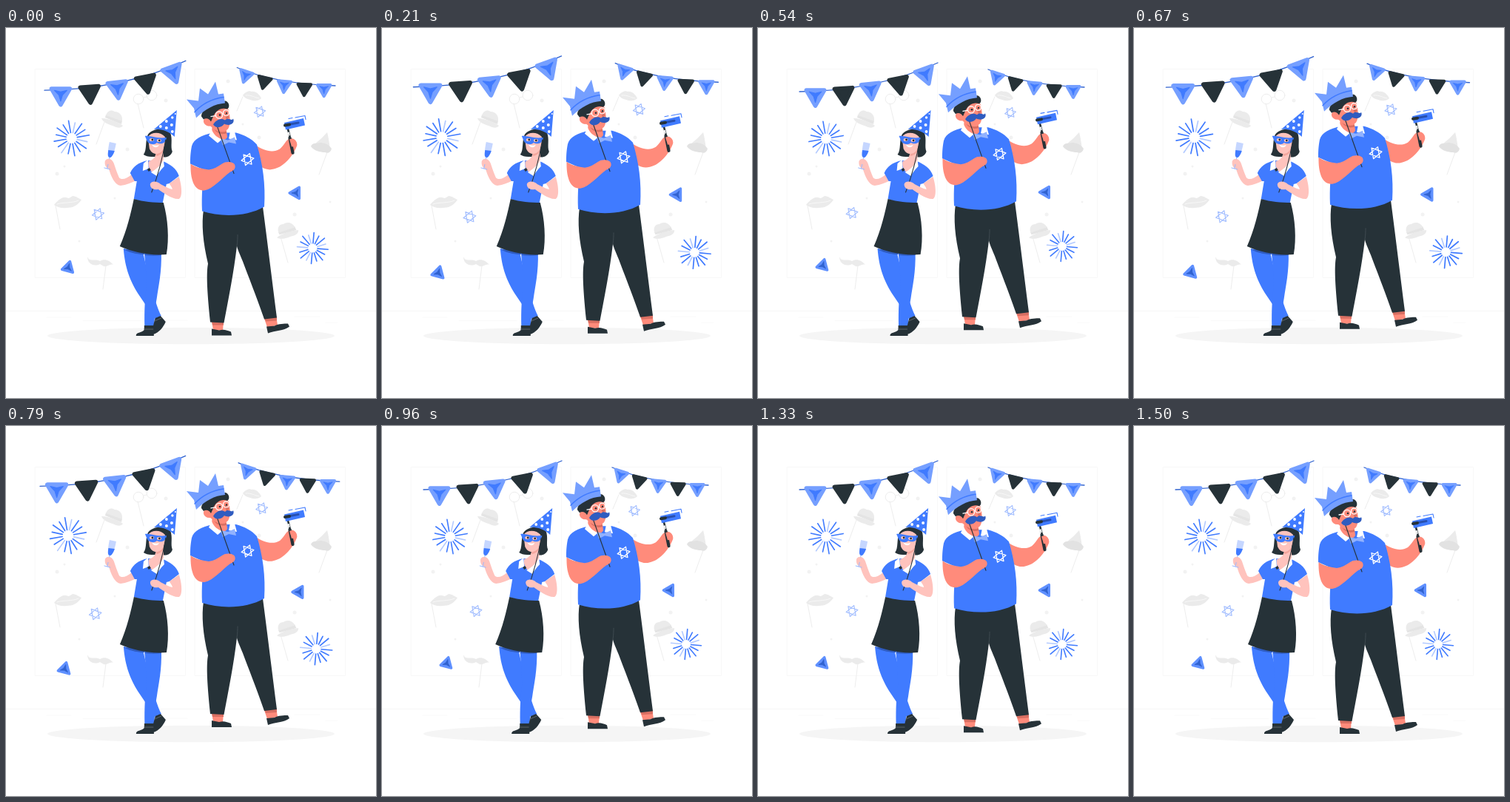
These frames come from a looping animation (500x500 px, 1540 ms). An HTML page:

```html
<!DOCTYPE html>
<html lang="en">
<head>
<meta charset="utf-8">
<title>Party</title>
<style>
html, body { margin: 0; width: 100%; height: 100%; overflow: hidden; background: #fff; }
svg { display: block; width: 100%; height: 100%; }
.blue { fill: #407bff; } .light { fill: #759fff; } .dark { fill: #263238; }
.deep { fill: #2f5cc0; } .white { fill: #fff; } .grey { fill: #ebebeb; }
.tan { fill: #ff8b7b; } .pink { fill: #ffc3bd; } .shade { fill: #d96f62; }
.line { fill: none; stroke-linecap: round; stroke-linejoin: round; }
</style>
</head>
<body>
<svg viewBox="0 0 500 500">
  <g class="line" stroke="#f8f8f8">
    <rect x="39.500" y="55.500" width="203" height="282"/>
    <rect x="255.500" y="55.500" width="203" height="282"/>
    <path stroke="#f6f6f6" d="M0 382.500H500"/>
    <path stroke="#fafafa" d="M55 391H88M104 395.500H182M390 390H424M432 398H448M215 395H245"/>
  </g>
  <ellipse cx="250" cy="416" rx="194" ry="11.300" fill="#f5f5f5"/>

  <g id="props">
    <g class="line" stroke="#ededed">
      <path d="M133 127L122 157M178 102L186 135M67 240L73 272M135 321L131 353M371 282L381 317M434 168L423 198M320 93L312 112"/>
      <circle cx="179" cy="96" r="6.800"/><circle cx="197" cy="91" r="6.800"/><path d="M186 94L190 93"/>
    </g>
    <g class="grey" id="hat">
      <path d="M129 122C135 121 152 127 158 132C155 136 150 135 144 132C137 130 131 127 129 122Z"/>
      <path fill="#e4e4e4" d="M134 121L135 117L157 125L156 130Z"/>
      <path d="M135 118C137 111 143 110 147 113C153 113 158 118 157 126Z"/>
    </g>
    <use href="#hat" transform="translate(234 152) rotate(-38 144 122)"/>
    <path class="grey" d="M65 239C70 233 76 228 81 229L85 230L90 227C95 227 99 231 102 232C97 240 90 243 82 243C75 244 69 242 65 239Z"/>
    <path class="line" stroke="#f8f8f8" d="M69 238C78 235 90 237 98 233"/>
    <path class="grey" d="M320 91C323 87 328 84 332 86C337 85 342 89 345 95C341 99 335 99 330 97C325 96 322 94 320 91Z"/>
    <path class="line" stroke="#f8f8f8" d="M324 91C331 90 336 94 342 95"/>
    <path class="grey" d="M110 309C113 317 120 311 127 315C133 311 140 314 145 320C140 318 138 323 132 322L127 319C119 323 110 319 110 309Z"/>
    <path class="grey" d="M418 156C425 151 430 145 434 141C436 148 437 157 438 163Z"/>
    <path fill="#e2e2e2" d="M412 160C414 154 420 157 424 155C430 155 436 157 440 163C439 168 435 170 431 168C425 168 416 166 412 160Z"/>
    <g fill="#f2f2f2" id="dots"></g>
  </g>

  <g id="decor"></g>

  <g id="woman">
    <path class="blue" d="M159 298C161 325 168 341 178 358L203 395L210 389C203 375 196 350 185 302Z"/>
    <path class="blue" d="M187 302L210 302C211 330 206 350 204 365C201 380 202 390 200 403L187.500 403C187 380 188 365 190 350C190 330 188 315 187 302Z"/>
    <path class="deep" d="M159 299C170 305 180 306 187 306V302ZM188 304L210 303V307C202 308 195 308 188 307Z"/>
    <path class="dark" d="M202 392L209 389L216 397C213 404 207 412 199 414C197 408 200 399 202 392ZM187 402L200 402V416H176C175 411 184 412 187 408Z"/>
    <path class="line" stroke="#5c6468" d="M201 396L210 392M187 407H199"/>
    <path class="pink" d="M170 198C163 204 156 206 153 202C150 195 148 189 146 183C144 176 136 175 134 180C133 186 136 189 139 190C142 200 147 212 155 213C163 212 170 209 176 206Z"/>
    <path class="blue" d="M191 179C179 182 172 187 168 196L174 207L177 207L173 231C185 236 200 237 212 236L217 211L221 210L234 200C231 190 222 184 212 180Z"/>
    <path class="dark" d="M173 231C186 235 200 236 213 236C219 258 221 285 217 306C195 308 172 303 154 295C164 272 169 250 173 231Z"/>
    <path class="dark" d="M192 144C198 135 216 134 222 141C226 150 222 160 225 167C223 173 217 176 211 174L197 174C192 174 189 173 186 171C191 165 188 152 192 144Z"/>
    <path class="pink" d="M203 165L213 160L213 179C208 189 202 195 197 194C193 190 192 184 193 180C200 178 203 174 203 165Z"/>
    <path fill="#f4a79e" d="M203 169C208 170 212 166 213 163V166C211 170 207 173 203 173Z"/>
    <path class="pink" d="M192 147C197 140 209 140 215 147C216 157 214 164 209 168C203 172 197 170 194 163Z"/>
    <path class="white" d="M192 178L186 183L185 193L193 190ZM196 195C203 191 210 185 213 178L214 187C209 192 206 196 204 200Z"/>
    <path class="dark" d="M191 191L194 189L196 192L193 194Z"/>
    <path class="white" d="M197 157C200 159 204 159 207 158C205 163 199 162 197 157Z"/>
    <path class="blue" d="M188 146C195 145 204 150 217 148C217 156 209 158 204 155C200 159 193 157 191 153Z"/>
    <g class="pink"><ellipse cx="197" cy="151" rx="3" ry="2"/><ellipse cx="207" cy="152" rx="3" ry="2"/></g>
    <g class="dark"><circle cx="198" cy="151" r="1.400"/><circle cx="207.500" cy="152" r="1.400"/></g>
    <path class="blue" d="M231 111L200 137C210 136 221 140 228 147Z"/>
    <g class="white">
      <circle cx="225" cy="121" r="1.700"/><circle cx="217" cy="126" r="1.900"/><circle cx="224" cy="131" r="2"/>
      <circle cx="209" cy="133" r="1.900"/><circle cx="217" cy="135" r="2"/><circle cx="225" cy="140" r="1.900"/><circle cx="229" cy="116" r="1"/>
    </g>
    <path class="line" stroke="#263238" stroke-width="1.100" d="M216 151C212 175 206 198 197 222"/>
    <path class="pink" d="M221 210L234 201C238 214 239 228 234 231C225 232 212 222 206 218C200 219 195 217 195 211C197 206 205 207 209 211C215 214 220 217 225 218C225 215 222 213 221 210Z"/>
    <path fill="#c5d6ff" d="M140 154L149 156C147 168 143 176 140 175C137 174 138 163 140 154Z"/>
    <path class="blue" d="M138.500 165L147 166C145 172 142 176 140 175C137 174 138 169 138.500 165Z"/>
    <path class="line" stroke="#9ab8ff" d="M140 175L137 190M133 189L141 191"/>
    <path class="pink" d="M134 181C135 176 140 176 143 179L144 184L137 184Z"/>
  </g>

  <g id="man">
    <path class="tan" d="M278 396H294L293 409H280ZM348 390L365 389L367 402L353 405Z"/>
    <path class="shade" d="M278 397H294V402H279ZM349 392L366 391V396L351 397Z"/>
    <path class="dark" d="M278 407L288 409C294 407 299 409 304 411L305 416H278ZM352 404L363 403C368 400 376 400 381 400L383 404C375 410 364 409 354 413Z"/>
    <path class="dark" d="M267 246L347 242C354 296 360 345 366 392L349 394C338 362 327 335 320 316C316 306 313 300 312 295C308 330 300 370 294.500 399L276 398C271 350 271 330 273 319C266 290 264 265 267 246Z"/>
    <path class="line" stroke="#465157" stroke-width=".8" d="M312 295C313 289 313 283 313 280"/>
    <path class="tan" d="M336 158C348 166 360 170 370 164C376 159 378 152 383 150C390 148 394 154 393 160C388 173 376 188 362 191C352 194 344 188 341 185Z"/>
    <path class="blue" d="M279 142C264 146 254 150 251 160C249 170 249 178 249 184L267 192C266 210 264 225 265 248C290 256 325 256 349 242C351 212 347 184 339 158C332 150 322 145 311 142Z"/>
    <path class="tan" d="M279 126L297 132L299 148C297 151 296 152 292 151C286 151 281 148 278 142Z"/>
    <path class="shade" d="M281 137C286 141 292 142 298 140L298 143C291 145 285 143 281 137Z"/>
    <path class="white" d="M278 138L274 146L286 156L292 151C286 149 281 145 278 138ZM303 140L309 141L312 152L301 150Z"/>
    <path fill="#91b2ff" d="M290 150L300 152L309 148L311 157L301 155L293 159Z"/>
    <path class="tan" d="M276 116C282 106 296 104 301 111C303 121 304 131 300 137C295 142 288 141 283 138L276 133C267 134 264 124 270 122Z"/>
    <path class="dark" d="M264 120C264 110 280 100 297 99C303 102 302 109 299 110C291 107 284 112 281 118L277 127C274 122 270 122 267 124Z"/>
    <path class="shade" d="M295 115L302 121L298 124Z"/>
    <g class="line" stroke="#fff" stroke-width="1.300"><circle cx="288" cy="118" r="4.600"/><circle cx="297.500" cy="115" r="4"/><path d="M283 119L277 120"/></g>
    <g class="dark"><circle cx="289" cy="118" r="1.300"/><circle cx="298" cy="115.500" r="1.200"/></g>
    <path class="light" d="M257 122L254 109L244 97L260 99L262 82L273 90L283 73L287 90L294 89L296 102C282 103 269 110 257 122Z"/>
    <path class="line" stroke="#407bff" stroke-width="1.500" d="M255 114C266 102 280 96 294 94"/>
    <path class="line" stroke="#263238" stroke-width="1.100" d="M285 132L308 197"/>
    <path class="deep" d="M280 131C283 125 291 121 296 125C300 120 305 127 307 123C310 129 302 134 295 130C291 136 283 136 280 131Z"/>
    <path class="tan" d="M249.500 184C256 189 266 191 274 192C281 191 286 188 292 184C297 180 307 181 309 185C311 190 308 193 303 195C292 203 280 218 268 220C254 221 249 205 249.500 184Z"/>
    <path class="line" stroke="#263238" stroke-width="2.600" d="M380.500 135L384 149"/>
    <path class="line" stroke="#fff" stroke-width="2" d="M382 142L382.600 145"/>
    <path class="line" stroke="#263238" stroke-width="4.200" d="M383.500 149L387.500 169"/>
    <path class="tan" d="M383 151C388 148 395 155 393 160L386 161Z"/>
    <path class="blue" d="M376 128.500L402 122.500L404 132L378 138Z"/>
    <path class="line" stroke="#2850b0" stroke-width="3" d="M384 130.500L395 128.500"/>
    <path class="line" stroke="#263238" stroke-width="4" d="M377 132L383 131"/>
    <path class="line" stroke="#407bff" stroke-width="1.100" d="M382 123L387 122M391 121.500L404 119L405 124"/>
    <g id="badge"></g>
  </g>
</svg>
<script>
const el = id => document.getElementById(id);
const FRAME = 1000 / 24, LAST = 36, LOOP = 1540, CYCLE = 1500;

const ring = (n, r, start) => Array.from({ length: n }, (_, i) => {
  const a = (start + i * 360 / n) * Math.PI / 180;
  return [r * Math.cos(a), r * Math.sin(a)].map(v => v.toFixed(2)).join(' ');
});
const poly = points => 'M' + points.join('L') + 'Z';
const place = (x, y, rot, body) => `<g transform="translate(${x} ${y}) rotate(${rot})">${body}</g>`;

// Rounded triangle, with a three-armed fold unless it is dark
function flag(x, y, rot, r, color, fold) {
  const inner = ring(3, r * .2, -90), outer = ring(3, r * .68, -30);
  const star = poly(inner.flatMap((p, i) => [p, outer[i]]));
  return place(x, y, rot,
    `<path d="${poly(ring(3, r, -30))}" fill="${color}" stroke="${color}" stroke-width="${r * .4}" stroke-linejoin="round"/>` +
    (fold ? `<path d="${star}" fill="${fold}" stroke="${fold}" stroke-width="${r * .08}" stroke-linejoin="round"/>` : ''));
}
const bunting = (flags, r) => flags.map(([x, y, rot], i) =>
  i % 2 ? flag(x, y, rot, r, '#263238') : flag(x, y, rot, r, '#759fff', '#407bff')).join('');
const cookie = (x, y, rot) => flag(x, y, rot, 8.6, '#5f90ff', '#3062cf');

const hexagram = (x, y, r, color, width) => place(x, y, 20,
  `<path class="line" stroke="${color}" stroke-width="${width}" d="${poly(ring(3, r, -90)) + poly(ring(3, r, 90))}"/>`);

function firework(x, y, r, rot, pale) {
  let rays = '';
  for (let i = 0; i < 16; i++) {
    const color = pale.includes(i) ? '#b3caff' : '#407bff';
    const end = r - (i % 2) * 2.5;
    rays += `<path stroke="${color}" d="M${r * .32} 0H${end}" transform="rotate(${i * 22.5})"/>`;
  }
  return place(x, y, rot, `<g class="line" stroke-width="1.600">${rays}</g>`);
}

const rope = d => `<path class="line" stroke="#3062cf" stroke-width="1.300" d="${d}"/>`;

el('decor').innerHTML =
  rope('M56 86Q160 85 243 47') +
  bunting([[77.5, 91, 0], [116, 88.5, -4], [152.5, 82.5, -6], [190.5, 75, -11], [226, 62, -20]], 14) +
  rope('M311 56Q360 77 441 80') +
  bunting([[322.5, 66, 18], [347, 74, 13], [373.5, 79, 5], [400, 83, 2], [426, 84, 0]], 9.9) +
  cookie(87.5, 321, 75) + cookie(389, 222, 90) +
  firework(92, 149.5, 23.5, -10, [1, 6, 13]) + firework(411, 295, 20.5, 5, [5, 8, 11, 15]) +
  hexagram(127, 250, 8, '#a3beff', 1.1) + hexagram(341, 114.5, 7.6, '#a3beff', 1.1);
el('badge').innerHTML = hexagram(326.5, 178, 8.5, '#fff', 1.3);
el('dots').innerHTML =
  [[164, 164, 2.5], [216, 98, 2.5], [69, 197, 2.5], [79, 187, 1.5], [99, 288, 1.5], [147, 230, 1.5],
   [300, 72, 2.5], [342, 148, 2.5], [390, 252, 2.5], [438, 235, 1.5], [320, 130, 1.5]]
    .map(([x, y, r]) => `<circle cx="${x}" cy="${y}" r="${r}"/>`).join('');

// Linear interpolation through [percent, value] stops
function track(stops, p) {
  const i = Math.max(1, stops.findIndex(s => s[0] >= p));
  const [[p0, v0], [p1, v1]] = [stops[i - 1], stops[i]];
  return v0 + (v1 - v0) * (p - p0) / (p1 - p0);
}
const beat = [[0, 1], [10, 1.1], [30, 1], [40, 1], [50, 1.1], [60, 1], [100, 1]];
const shake = [0, -1, 2, -4, 4, -4, 4, -4, 2, -1, 0].map((v, i) => [i * 10, v]);
const float = [[0, 0], [50, -10], [100, 0]];

function draw(now) {
  const step = Math.min(LAST, Math.floor((now % LOOP + 4) / FRAME));
  const p = Math.min(100, (step + .75) * FRAME / CYCLE * 100);
  el('decor').setAttribute('transform', `translate(250 176) scale(${track(beat, p)}) translate(-250 -176)`);
  el('woman').setAttribute('transform', `translate(${track(shake, p)} 0)`);
  el('man').setAttribute('transform', `translate(0 ${track(float, p)})`);
}

const start = performance.now();
function tick() {
  draw(performance.now() - start);
  requestAnimationFrame(tick);
}
tick();
</script>
</body>
</html>
```
